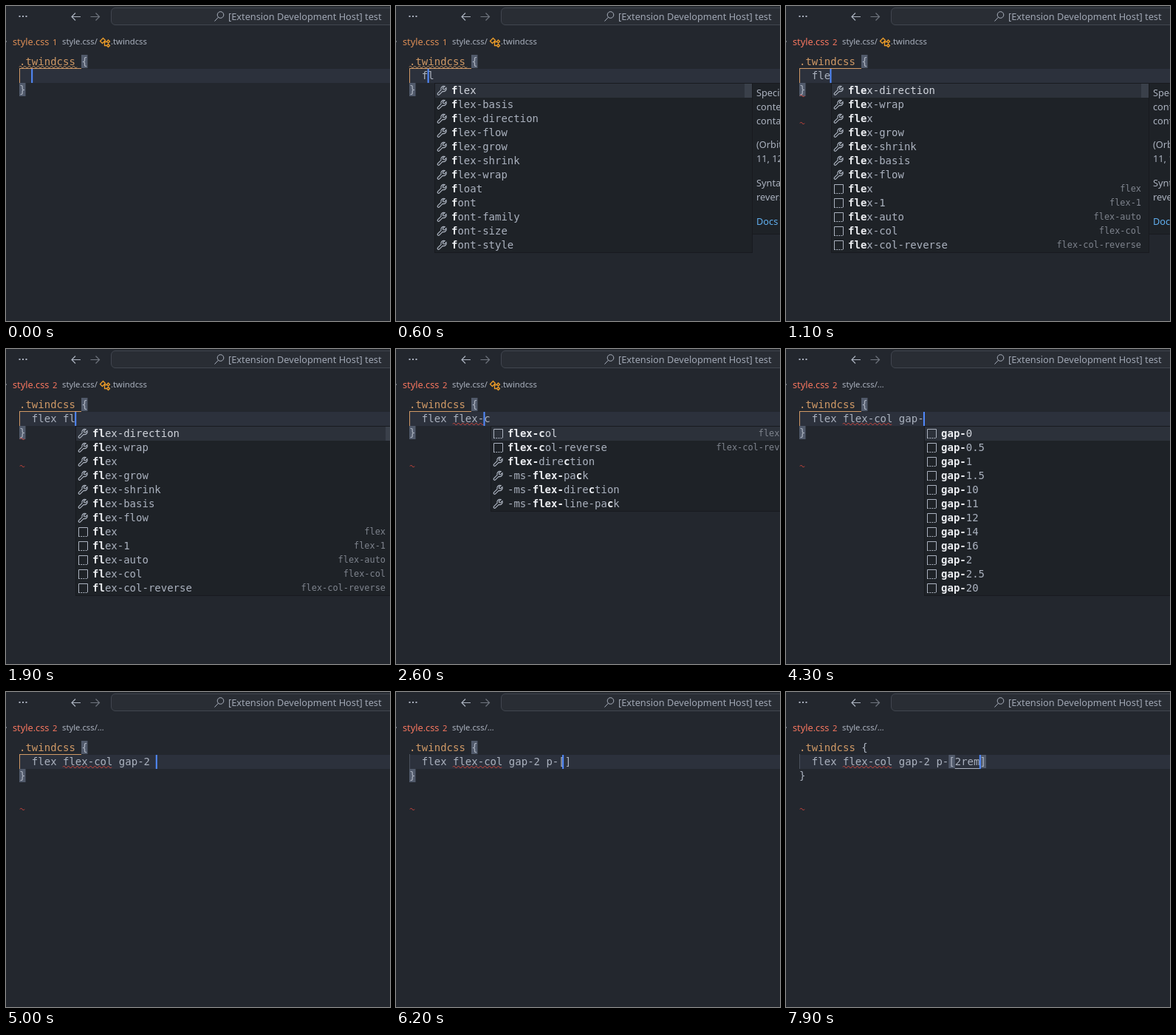
An HTML page for the animation above (8 s loop, 520 px wide and 426 px high).

```html
<!DOCTYPE html>
<html lang="en">
<head>
<meta charset="utf-8">
<title>CSS completion</title>
<style>
html, body { margin: 0; width: 100%; height: 100%; overflow: hidden; background: #23272e; }
svg { display: block; }
text { white-space: pre; fill: #abb2bf; }
.code { font: 14px "DejaVu Sans Mono", monospace; }
.detail { font: 11.9px "DejaVu Sans Mono", monospace; fill: #7f848e; text-anchor: end; }
.ui { font: 12.75px "Noto Sans", sans-serif; }
.crumb { font: 11.25px "Noto Sans", sans-serif; }
.hit { font-weight: bold; fill: #eceef2; }
.line { fill: none; stroke: #abb2bf; }
</style>
</head>
<body>
<svg id="stage" width="520" height="426" viewBox="0 0 520 426"></svg>
<script>
const LOOP = 8000, TICK = 100, CH = 8.43, LEFT = 18, ROW = 19;
const ORANGE = '#d19a66', RED = '#d9483e';
const stage = document.getElementById('stage');
const col = k => LEFT + CH * (k + 2);

const util = (name, sizes) => sizes.split(' ').map(s => '#' + name + s).join('|');
const SIZES = '0 0.5 1 1.5 10 11 12 14 16 2 2.5 20';
// Rows marked # are utility classes, the others are CSS properties.
const LISTS = {
  f: 'flex|flex-basis|flex-direction|flex-flow|flex-grow|flex-shrink|flex-wrap|float|font|font-family|font-size|font-style',
  fle: 'flex-direction|flex-wrap|flex|flex-grow|flex-shrink|flex-basis|flex-flow|#flex|#flex-1|#flex-auto|#flex-col|#flex-col-reverse',
  flex: 'flex|flex-direction|flex-wrap|flex-grow|flex-shrink|flex-basis|flex-flow|#flex|#flex-1|#flex-auto|#flex-col|#flex-col-reverse',
  'flex-': 'flex-direction|flex-wrap|flex-grow|flex-shrink|flex-basis|flex-flow|#flex-1|#flex-auto|#flex-col|#flex-col-reverse|#flex-initial|#flex-none',
  'flex-c': '#flex-col|#flex-col-reverse|flex-direction|-ms-flex-pack|-ms-flex-direction|-ms-flex-line-pack',
  'flex-co': '#flex-col|#flex-col-reverse|flex-direction|-ms-flex-direction',
  ga: 'grid-area: ;|gap|' + util('gap-', '0 0.5 1 1.5 10 11 12 14 16 2'),
  'gap-': util('gap-', SIZES),
  'gap-2': util('gap-2', ' .5 0 4 8'),
  p: 'padding|padding-block|padding-block-end|padding-block-start|padding-bottom|padding-inline|padding-inline-end|padding-inline-start|padding-left|padding-right|padding-top|page-break-after',
  'p-': util('p-', SIZES),
  2: '#p-[2]', '2r': '#p-[2r]', '2re': '#p-[2re]', '2rem': '#p-[2rem]'
};

// time, typed text, completion query, list key, caret lag in columns
const A = 'flex ', B = A + 'flex-col ', C = B + 'gap-2 ';
const STEPS = [
  [0, ''],
  [300, 'f'], [400, 'f', 'f', 'f'],
  [600, 'fl', 'f', 'f', 1], [700, 'fl', 'fl', 'fle'],
  [900, 'fle', 'fl', 'fle', 1], [1000, 'fle', 'fle', 'fle'],
  [1200, 'flex', 'flex', 'flex', 1], [1300, 'flex', 'flex', 'flex'],
  [1400, A],
  [1600, A + 'f', 'f', 'f'],
  [1800, A + 'fl', 'fl', 'fle'],
  [2000, A + 'fle', 'fle', 'fle'],
  [2100, A + 'flex', 'flex', 'flex'],
  [2300, A + 'flex-', 'flex-', 'flex-'],
  [2600, A + 'flex-c', 'flex-c', 'flex-c', 1], [2700, A + 'flex-c', 'flex-c', 'flex-c'],
  [2800, A + 'flex-co', 'flex-co', 'flex-co'],
  [3000, A + 'flex-col'], [3200, B],
  [3400, B + 'g', 'g', 'ga'],
  [3600, B + 'ga', 'ga', 'ga'],
  [3800, B + 'gap', 'gap', 'gap-'],
  [4200, B + 'gap-', 'gap-', 'gap-', 1], [4300, B + 'gap-', 'gap-', 'gap-'],
  [4700, B + 'gap-2', 'gap-2', 'gap-2'],
  [4900, B + 'gap-2'], [5000, C],
  [5400, C + 'p', '', '', 1], [5500, C + 'p', 'p', 'p'],
  [5800, C + 'p-', '', '', 1], [5900, C + 'p-', 'p-', 'p-'],
  [6200, C + 'p-[', '', '', .35], [6300, C + 'p-['],
  [6800, C + 'p-[2', '', '', 1], [6900, C + 'p-[2', '2', '2'],
  [7100, C + 'p-[2r', '2r', '2r'],
  [7200, C + 'p-[2re', '2re', '2re'],
  [7400, C + 'p-[2rem', '2rem', '2rem'],
  [7500, C + 'p-[2rem']
];

const rect = (x, y, w, h, fill, more = '') =>
  `<rect x="${x}" y="${y}" width="${w}" height="${h}" fill="${fill}" ${more}/>`;
const text = (x, y, cls, body, more = '') =>
  `<text x="${x}" y="${y}" class="${cls}" ${more}>${body}</text>`;
const path = (d, more = '') => `<path class="line" d="${d}" ${more}/>`;
const paint = c => `style="fill:${c}"`;
const ink = c => `style="stroke:${c}"`;

function squiggle(x, y, width, color) {
  const waves = Math.max(1, Math.round(width / 6));
  return path(`M${x} ${y}` + 'q1.5-3 3 0q1.5 3 3 0'.repeat(waves), ink(color));
}

// Bold the letters of the query in the order they occur.
function mark(label, query) {
  let i = 0;
  return [...label].map(c =>
    c === query[i] ? (i++, `<tspan class="hit">${c}</tspan>`) : c).join('');
}

const WRENCH = 'M11 1.6A3.8 3.8 0 0 0 6.1 6.4L1.6 10.9a1.4 1.4 0 0 0 2 2L8.2 8.4A3.8 3.8 0 0 0 13 3.6L10.7 5.9 8.7 5.6 8.5 3.8Z';
function icon(x, y, utility) {
  const body = utility
    ? path('M1.5 13V1.5H13.5V13') + path('M1 13.5H14', 'stroke-dasharray="2 1.2"')
    : path(WRENCH, 'stroke-width="1.2"');
  return `<g transform="translate(${x} ${y})">${body}</g>`;
}

function docs(x) {
  const lines = [[122, 'Specifies'], [141, 'contents'], [160, 'container'], [192, '(Orbit'],
    [211, '11, 12'], [244, 'Syntax'], [263, 'reverse']];
  return rect(x + .5, 104.5, 430, 204, '#1e2227', 'stroke="#181a1f"') +
    lines.map(([y, s]) => text(x + 6, y, 'ui', s)).join('') +
    text(x + 6, 296, 'ui', 'Docs', paint('#61afef'));
}

function popup(x, query, key) {
  const rows = LISTS[key].split('|');
  let out = rect(x + .5, 104.5, 430, rows.length * ROW + 1, '#1e2227', 'stroke="#181a1f"') +
    rect(x + 1, 105, 420, ROW, '#2c313a');
  rows.forEach((row, i) => {
    const y = 105 + i * ROW, utility = row[0] === '#', label = row.replace('#', '');
    out += icon(x + 3, y + 2, utility) +
      text(x + 23, y + 14, 'code', mark(label, query), i ? '' : paint('#d0d4dc'));
    if (utility) out += text(x + 420, y + 13, 'detail', label);
  });
  if (rows.length > 11) out += rect(x + 420, 105, 10, ROW, '#3a404a');
  return out + (rows[0][0] === '#' ? '' : docs(x + 430));
}

function header(t) {
  const tone = t < 700 ? '#dc8d55' : '#f6765f';
  let out = [18.5, 23, 27.5].map(x => rect(x - 1, 13, 2, 2, '#abb2bf')).join('') +
    path('M101 14.5H89M94 9.5L89 14.5L94 19.5', 'stroke-width="1.2"') +
    path('M114.500 14.500H126.500M121.500 9.500L126.500 14.500L121.500 19.500', 'stroke-width="1.2" ' + ink('#70757f')) +
    rect(142.5, 2.5, 420, 23, '#292d34', 'rx="5.5" stroke="#41464f"') +
    '<circle class="line" cx="290.500" cy="12" r="4.300"/>' + path('M287.500 15.200L282.500 20.500') +
    text(301, 18.5, 'ui', '[Extension Development Host] test', paint('#a0a7b4')) +
    rect(0, 47, 1, 2, '#70757f') +
    text(9, 52.5, 'ui', 'style.css', paint(tone)) +
    text(63, 52.5, 'crumb', t < 700 ? '1' : '2', paint(tone)) +
    text(76, 52, 'crumb', 'style.css/' + (t < 4200 ? '' : '…'));
  if (t < 4200) {
    out += path('M127.500 47.500L131.500 43.500L134.500 46.500L130.500 50.500ZM132.500 48.500H136.500M133.500 48.500V53.500H136.500' +
      'M136.500 48L138.500 46L140.500 48L138.500 50ZM136.500 53.500L138.500 51.500L140.500 53.500L138.500 55.500Z',
      'stroke-width="1.3" ' + ink('#ee9d28')) + text(142, 52, 'crumb', '.twindcss');
  }
  return out;
}

function editor(t, typed, lag) {
  const inBracket = typed.includes('['), inner = t >= 6300, guide = inBracket ? '#4b515c' : ORANGE;
  const match = (x, y) => rect(x, y, 8.5, 18, '#515a6b');
  const open = col(22), close = col(typed.length);
  let out = rect(18, 85, 502, 19, '#2c313c') + path('M18.5 84V104', ink(guide));
  if (!inBracket) out += path('M18 84.5H102', ink(guide));
  out += inner
    ? match(open, 85) + match(close, 85) + path(`M${open + CH} 103.5H${close}`)
    : match(102, 66) + match(18, 104);
  out += text(LEFT, 80, 'code', `<tspan style="fill:${ORANGE}">.twindcss</tspan> {`) +
    text(col(0), 99, 'code', typed + (inBracket ? ']' : '')) +
    text(LEFT, 118, 'code', '}');

  if (t < 700) out += squiggle(18, 82.5, 76, ORANGE);
  else {
    out += squiggle(19, 158.5, 6, RED);
    if (t < 2100) out += squiggle(19, 121.5, 6, RED);
  }
  if (t >= 2300) out += squiggle(77, 101.5, (t < 3000 ? 5 : 8) * CH, RED);
  return out + rect(34.2 + CH * (typed.length - lag), 85, 2, 19, '#528bff');
}

let shown = -1;
function frame(now) {
  const t = Math.floor(now % LOOP / TICK) * TICK;
  if (t !== shown) {
    shown = t;
    const [, typed, query, key, lag = 0] = STEPS.findLast(s => s[0] <= t);
    stage.innerHTML = rect(0, 0, 520, 426, '#23272e') + header(t) + editor(t, typed, lag) +
      (key ? popup(Math.round(35.3 + CH * typed.length), query, key) : '');
  }
  requestAnimationFrame(frame);
}
frame(0);
</script>
</body>
</html>
```
